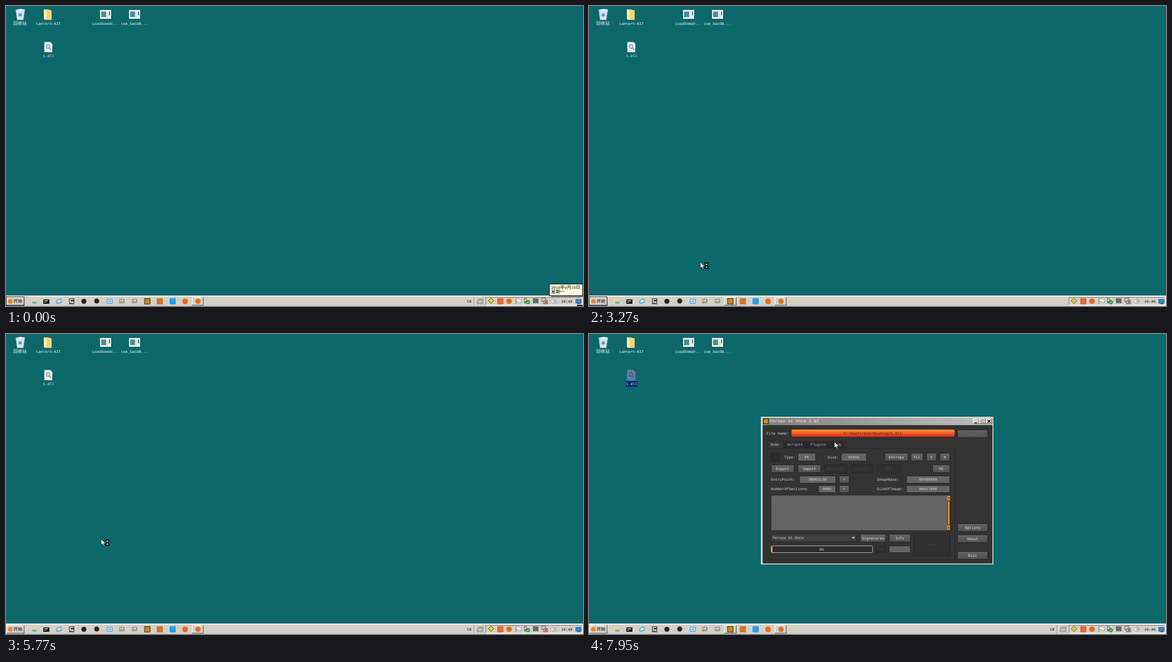
Recreate the animation shown at these times as an HTML page. Size 1037 by 540 pixels, loop 8000 ms.

```html
<!DOCTYPE html>
<html>
<head>
<meta charset="utf-8">
<title>Desktop</title>
<style>
html, body { margin: 0; width: 100%; height: 100%; overflow: hidden; background: #0d686b; }
svg { display: block; width: 1037px; height: 540px; }
text { font: 6.67px "Liberation Mono", monospace; text-rendering: geometricPrecision; white-space: pre; }
text.bold { font-size: 7.75px; font-weight: bold; }
text .cjk { font: 8px "Noto Sans CJK SC", "Noto Sans CJK", sans-serif; }
</style>
</head>
<body>
<svg id="stage" viewBox="0 0 1037 540" xmlns="http://www.w3.org/2000/svg"></svg>
<script>
const LOOP = 8000, FACE = '#d4d0c8', NAVY = '#0a246a', APP = 'Peruse At Once';

// Drawing helpers; text is placed by its vertical centre.
const rect = (x, y, w, h, fill, more = '') =>
  `<rect x="${x}" y="${y}" width="${w}" height="${h}" fill="${fill}" ${more}/>`;
const disc = (x, y, r, fill, more = '') => `<circle cx="${x}" cy="${y}" r="${r}" fill="${fill}" ${more}/>`;
const path = (d, fill, more = '') => `<path d="${d}" fill="${fill}" ${more}/>`;
const group = (id, body, more = '') => `<g id="${id}" ${more}>${body}</g>`;
const text = (x, y, s, fill = '#000', more = '') =>
  `<text x="${x}" y="${y + 2.4}" fill="${fill}" ${more}>` +
  s.replace(/>/g, '&gt;').replace(/[\u2e80-\uffff]+/g, m => `<tspan class="cjk">${m}</tspan>`) + '</text>';
const middle = (x, y, s, fill) => text(x, y, s, fill, 'text-anchor="middle"');
const edges = (x, y, w, h, light, dark) =>
  rect(x, y, w, 1, light) + rect(x, y, 1, h, light) +
  rect(x, y + h - 1, w, 1, dark) + rect(x + w - 1, y, 1, h, dark);
const raised = (x, y, w, h) => rect(x, y, w, h, FACE) + edges(x, y, w, h, '#fff', '#505050');

function desktopIcons() {
  const program = x => rect(x, 7, 20, 16, '#f4f6f6') + rect(x, 7, 20, 2, '#dfe4e6') +
    rect(x + 2, 10, 9, 10, '#4f8f8f') + rect(x + 12, 10, 3, 10, '#d8e0e0') + rect(x + 16.5, 10, 1.5, 7, '#345');
  return path('M17.5 7L34 6 31 25H20Z', '#d5e2ec', 'stroke="#8fa7b8" stroke-width=".7"') +
    path('M18 7l8-2 8 2-8 2Z', '#f3f8fb') + disc(25.5, 16, 3, '#5b9bdc') +
    path('M68 6h7l7 2v17H70l-2-2Z', '#f0d574') + path('M68 6l5 3v16l-5-2Z', '#fbeeb0') +
    program(169) + program(221) +
    middle(25, 32, '回收站', '#fff') + middle(76.5, 32, 'Lantern-KIT', '#fff') +
    middle(179, 32, 'LoadSomeD...', '#fff') + middle(230.5, 32, 'com_SandB...', '#fff') +
    fileIcon() + middle(76.5, 89.5, '1.dll', '#fff');
}

function fileIcon() {
  return path('M69 65h11l3 3v15H69Z', '#f6f8f9', 'stroke="#c5ced2" stroke-width=".5"') +
    disc(75.5, 73, 3.3, '#d3e2ea', 'stroke="#7793a4" stroke-width="1.4"') +
    path('M77 75l4 4', 'none', 'stroke="#7793a4" stroke-width="1.7"');
}

function launchIcons() {
  const lens = x => rect(x - 4, 528, 8, 6, '#f3e8c9', 'stroke="#55534c" stroke-width=".8"') +
    disc(x + 1, 530, 2.7, '#c7ddf0', 'stroke="#666" stroke-width=".8"') +
    path(`M${x - 1} 532l-3 3`, 'none', 'stroke="#b37824" stroke-width="1.5"');
  return path('M45 527h4l1 1h4v8h-9Z', '#f2d57b') + rect(47, 532, 8, 4, '#6ab0dd') +
    rect(67, 527, 11, 9, '#111') + rect(67, 527, 11, 1.3, '#b8bcc0') + rect(68.5, 530, 7, 1.2, '#fff') + rect(69, 533, 3, 1, '#ddd') +
    path('M90 533l2-4 7-2 1 7-8 2Z', '#8fc7e9', 'stroke="#4a94c2" stroke-width=".8"') + rect(93, 530, 5, 2, '#edf8ff') +
    rect(114, 527, 8, 9, '#f4f4f4', 'stroke="#222" stroke-width="1.2"') + rect(116, 529, 6, 3, '#333') + rect(115, 534, 5, 1, '#333') +
    disc(140, 531.5, 4.5, '#222') + disc(163, 531, 4.5, '#292521') +
    rect(182, 528, 9, 7, '#eaf6ff', 'stroke="#3f94d0" stroke-width="1.2"') + rect(184, 530, 5, 3, '#69b3e0') +
    lens(208) + lens(231) +
    rect(271, 526, 11, 11, '#c87a2a') + rect(294, 526, 11, 11, '#20a0e8') + disc(322, 531.5, 5.2, '#e96a1e');
}

function tray() {
  return edges(862, 524, 174, 15, '#808080', '#fff') +
    rect(868.2, 527.2, 7, 7, '#f5cf1c', 'transform="rotate(45 871.7 530.7)" stroke="#222" stroke-width=".8"') +
    rect(883, 526, 11, 11, '#e06a35') + disc(904, 531.5, 5, '#e56b25') +
    rect(916, 526, 1, 11, '#777') + path('M917 527h4l1 1h4v5h-4l-1-1h-4Z', '#fff', 'stroke="#777" stroke-width=".7"') +
    rect(931, 526, 5, 9, '#777') + rect(932, 528, 3, 3, '#ddd') + disc(938, 533, 3.7, '#279b38') +
    path('M936 533l1.5 1.5 2.5-3', 'none', 'stroke="#fff"') +
    rect(947, 526, 10, 9, '#6a6a6a') +
    rect(963, 526, 7, 6, '#ddd', 'stroke="#555"') + rect(966, 530, 7, 6, '#ddd', 'stroke="#555"') +
    path('M968 531l4 4m0-4l-4 4', 'none', 'stroke="#d22" stroke-width="1.4"') +
    path('M979 530h2l3-3v9l-3-3h-2Z', '#f5f5f5', 'stroke="#888" stroke-width=".6"') +
    path('M986 529q2 2.5 0 5m1.5-6.500q3 4 0 8', 'none', 'stroke="#888" stroke-width=".8"') +
    text(998, 531.5, '19:49') + rect(1024, 528, 10, 7, '#3488d0', 'stroke="#2b567c" stroke-width=".8"') +
    rect(1027, 535, 5, 1.5, '#444');
}

function taskbar() {
  const badge = (x, y) => rect(x, y, 11, 11, '#2b2110') + rect(x + 1, y + 1, 9, 9, '#c98a1c');
  return rect(0, 521, 1037, 19, FACE) + rect(0, 522, 1037, 1, '#fff') +
    raised(1, 524, 32, 15) + disc(8, 531.5, 4.3, '#e58a32') + text(13.5, 531.5, '开始') +
    group('focus', rect(.5, 523.5, 32, 15.5, 'none', 'stroke="#111"')) +
    launchIcons() + group('task', raised(243, 524, 22, 15)) + badge(248.5, 526) +
    raised(334, 524, 21, 15) + disc(345, 531.5, 4.8, '#e56b25') + tray() +
    group('lang', text(828.5, 531.5, 'CH') + rect(841, 524, 1, 15, '#808080') + rect(842, 524, 1, 15, '#fff') +
      path('M847 530l3-3h8l-1 9h-10Z', '#a9a7a2', 'stroke="#85837e" stroke-width=".7"') + rect(849, 531, 7, 1, '#e4e2dc') + rect(848, 533, 7, 1, '#e4e2dc')) +
    group('tip', rect(976.5, 500.5, 60, 21, '#ffffe1', 'stroke="#000"') +
      text(980, 506.5, '2019年9月23日') + text(980, 514.5, '星期一') + rect(980, 522, 57, 1.5, '#777') + rect(1026, 538, 10, 2, '#111'));
}

function menu() {
  const arrow = y => path(`M258 ${y - 2.5}l3 2.5-3 2.5Z`, '#000');
  const line = y => rect(148, y, 116, 1, '#808080') + rect(148, y + 1, 116, 1, '#fff');
  const screen = y => rect(150, y - 4, 9, 7, '#2456b0', 'stroke="#333" stroke-width=".7"') + rect(152, y + 3, 5, 1.3, '#444');
  const off = (y, s) => text(161.7, y + .7, s, '#fff') + text(161, y, s, '#8a8780');
  const active = (id, y, s) => group(id, rect(148, y - 6, 116, 12, NAVY) + text(161, y, s, '#fff') + (id === 'sortOn' ? path(`M258 ${y - 2.5}l3 2.5-3 2.5Z`, '#fff') : ''));
  return group('shadow', rect(149, 358, 120, 140, '#02383a', 'opacity=".65"')) +
    group('menu', raised(146, 355, 121, 141) +
      text(161, 362, '查看(V)') + arrow(362) + text(161, 374, '排序方式(O)') + arrow(374) + text(161, 386, '刷新(E)') +
      line(394) + off(404, '粘贴(P)') + off(416, '粘贴快捷方式(S)') + text(161, 428, '撤消 删除(U)') + text(228, 428, 'Ctrl+Z') +
      line(436) + text(161, 446, '新建(W)') + arrow(446) + line(454) +
      screen(464) + text(161, 464, '屏幕分辨率(C)') +
      rect(150, 473, 6, 7, '#e8e8e8', 'stroke="#555" stroke-width=".7"') + rect(154, 477, 5, 4, '#3a78b5') + text(161, 476.5, '小工具(G)') +
      screen(488) + text(161, 488.5, '个性化(R)') +
      active('sortOn', 374, '排序方式(O)') + active('refreshOn', 386, '刷新(E)')) +
    group('submenu', rect(268, 369, 58, 51, '#02383a', 'opacity=".65"') + raised(265, 366, 59, 52) +
      ['名称', '大小', '项目类型', '修改日期'].map((s, i) => text(276, 374 + 12 * i, s)).join(''));
}

function frame(height) {
  const button = (x, mark) => raised(x, 152, 11.5, 10) + mark;
  return rect(310.5, 150.5, 415, height - 3, 'none', `stroke="${FACE}" stroke-width="3"`) +
    edges(309, 149, 418, height, '#ebe9e3', '#b0aca4') +
    rect(312, 151, 413, 13, 'url(#title)') + rect(313, 152, 10, 10, '#2b2110') + rect(314, 153, 8, 8, '#c98a1c') +
    text(325, 157, APP + ' 2.02', FACE, 'class="bold"') +
    button(690, rect(693, 159, 4, 1.3, '#000')) + button(701.5, rect(704.5, 154.5, 5.5, 5, 'none', 'stroke="#888"')) +
    button(713, path('M716.500 154.500l5 5m0-5l-5 5', 'none', 'stroke="#000" stroke-width="1.300"'));
}

function panel(full) {
  const shift = full ? 0 : -57;
  const box = (x, y, w, h, fill, s, ink, line) =>
    rect(x + .5, y + .5, w - 1, h - 1, fill, `rx="2" stroke="${line}"`) + middle(x + w / 2, y + h / 2, s, ink);
  const button = (x, y, w, s, h = 15) => box(x, y, w, h, 'url(#button)', s, '#e8e8e8', '#232323');
  const field = (x, y, w, s, h = 14) => box(x, y, w, h, '#646464', s, '#e0e0e0', '#232323');
  const dim = (x, y, w, s, h = 16) => box(x, y, w, h, '#303030', s, '#454545', '#262626');
  const label = (x, y, s) => text(x, y, s, '#ddd');
  const when = s => full ? s : '';

  const details = button(327, 235, 42, 'Export') + button(375, 235, 42, 'Import') +
    dim(422, 235, 42, 'Resource') + dim(470, 235, 42, 'Overlay') + dim(517, 235, 43, '.NET') + button(617, 235, 32, 'PE') +
    label(327, 261.5, 'EntryPoint:') + field(378, 255, 66, '00001c30') + button(449, 255, 19, '>', 14) +
    label(517, 261.5, 'ImageBase:') + field(570, 255, 79, '00400000') +
    label(327, 279, 'NumberOfSections:') + field(412, 272, 32, '0005') + button(449, 272, 19, '>', 14) +
    label(517, 279, 'SizeOfImage:') + field(570, 272, 79, '00017000');

  const lower = rect(327, 290, 322, 64, '#646464', 'stroke="#272727"') + rect(644, 290, 5, 64, '#333') +
    rect(645, 301, 3, 42, '#e8912c') + rect(644, 291, 5, 9, '#d88424') + rect(644, 344, 5, 9, '#d88424') +
    rect(646, 294, 1.5, 2, '#222') + rect(646, 348, 1.5, 2, '#222') +
    rect(327, 360, 154, 14, '#414141', 'rx="2" stroke="#272727"') + label(330, 367, APP) + path('M472 365.500h6l-3 3Z', '#ddd') +
    button(487, 360, 47, 'Signatures') + button(539, 360, 39, 'Info') + dim(583, 358, 66, 'Stop', 41) +
    rect(327.5, 381.5, 182, 12, '#2c2c2c', 'rx="2" stroke="#b5b5b5"') +
    when(group('progress', rect(328, 382, 2, 11, '#e8912c') + middle(418, 387.5, '0%', '#ddd'))) +
    dim(515, 381, 19, '>', 13) + field(539, 381, 39, '', 13) +
    button(662, 341, 55, 'Options') + button(662, 361, 55, 'About') + button(662, 391, 55, 'Exit');

  return rect(312, 164, 413, 249 + shift, '#333') +
    label(319, 179, 'File name:') + rect(364, 172, 293, 13, 'url(#fire)', 'rx="2"') +
    when(middle(510, 179, 'C:/Users/pim/Desktop/1.dll', '#3a1509')) + button(662, 172, 55, '...') +
    rect(319.5, 205.5, 338, 201 + shift, 'none', 'stroke="#282828"') +
    rect(349, 193, 111, 12, '#292929', 'rx="2"') + rect(320, 192, 29, 14, '#363636', 'stroke="#282828"') +
    middle(334, 198.5, 'Scan', '#ddd') + middle(370, 198.5, 'Scripts', '#bbb') +
    middle(412, 198.5, 'Plugins', '#bbb') + middle(447, 198.5, 'Log', '#bbb') +
    rect(327.5, 214.5, 15, 15, '#2d2d2d', 'rx="2" stroke="#222"') +
    label(351, 222, 'Type:') + field(375, 214, 33, when('PE'), 15) +
    label(429, 222, 'Size:') + field(453, 214, 46, when('81920'), 15) +
    button(531, 214, 43, 'Entropy') + button(578, 214, 23, 'FLC') + button(606, 214, 19, 'S') + button(630, 214, 19, 'H') +
    when(details) + `<g transform="translate(0 ${shift})">${lower}</g>`;
}

function pointer() {
  const ink = 'stroke="#000" stroke-width=".8" stroke-linejoin="round"';
  return group('arrow', path('M0 0V11.300L2.700 8.800 4.600 13 6.400 12.200 4.600 8.200H8Z', '#fff', ink)) +
    group('hourglass', path('M8 1h6.600v2.500L12.500 6.300l2.100 2.700v2.600H8V9l2.100-2.700L8 3.500Z', '#111', 'stroke="#000" stroke-width=".600"') +
      path('M9 3h4.600l-2.300 2.500Zm2.300 4.500l2 2.500H9.300Z', '#fff')) +
    group('hand', path('M-1-.5h2v4l5.500 1.300v3l-1.300 3H-1.500L-3.500 6l1.200-.8 1.300 1Z', '#fff', ink));
}

const gradient = (id, a, b, across) =>
  `<linearGradient id="${id}" x2="${across}" y2="${1 - across}"><stop stop-color="${a}"/><stop offset="1" stop-color="${b}"/></linearGradient>`;

document.getElementById('stage').innerHTML =
  '<defs>' + gradient('title', '#808080', '#c0c0c0', 1) + gradient('button', '#646464', '#505050', 0) + gradient('fire', '#ff9638', '#dc2613', 0) + '</defs>' +
  rect(0, 0, 1037, 540, '#0d686b') + group('icons', desktopIcons()) +
  group('selected', rect(69, 65, 14, 18, '#173b78', 'opacity=".65"') + rect(66, 85, 21, 10, NAVY) + middle(76.5, 89.5, '1.dll', '#fff')) +
  group('small', frame(210)) + group('smallBody', panel(false)) +
  group('large', frame(266) + panel(true)) +
  taskbar() + menu() +
  group('ghost', fileIcon() + middle(76.5, 89.5, '1.dll', '#fff'), 'opacity=".5"') +
  group('pointer', pointer());

// Visible spans of each layer in ms, as pairs of start and end.
const spans = {
  tip: [0, 2300], lang: [0, 2300, 3430, LOOP], task: [2330, 3430, 5800, LOOP], focus: [0, 3900],
  icons: [0, 5590, 5650, LOOP], shadow: [4360, 5560], menu: [4310, 5560], sortOn: [4830, 5270],
  refreshOn: [5270, 5560], submenu: [5180, 5560], small: [5950, 7750], smallBody: [6550, 7750],
  large: [7750, LOOP], progress: [7900, LOOP], selected: [7050, LOOP], ghost: [7100, 7750],
  pointer: [20, LOOP], hourglass: [2840, 5970]
};

// Pointer stops: time, x, y.
const stops = [
  [20, 703, 461], [820, 243, 530], [860, 243, 530], [1310, 182, 530], [1460, 182, 530],
  [1900, 265, 530], [2140, 250, 530], [3090, 250, 530], [3270, 200, 462], [3450, 146, 355],
  [3670, 146, 355], [4140, 163, 375], [4830, 163, 375], [5270, 171, 386], [5650, 171, 386],
  [5970, 171, 342], [6220, 171, 342], [6420, 171, 193], [6890, 75, 73], [7050, 75, 73],
  [7850, 437, 191], [7950, 441, 194], [LOOP, 441, 194]
];
const fades = [[4510, 1], [4460, .6], [4410, .25], [4360, .12], [0, .05]];
const byId = id => document.getElementById(id);
const show = (id, on) => { byId(id).style.display = on ? '' : 'none'; };
const within = (t, span) => span.some((from, i) => i % 2 === 0 && t >= from && t < span[i + 1]);

function pointerAt(t) {
  const next = Math.max(1, stops.findIndex(s => s[0] > t));
  const [t0, x0, y0] = stops[next - 1], [t1, x1, y1] = stops[next];
  const k = Math.max(0, (t - t0) / (t1 - t0));
  return [Math.round(x0 + (x1 - x0) * k), Math.round(y0 + (y1 - y0) * k)];
}

function draw() {
  const t = performance.now() % LOOP;
  for (const id in spans) show(id, within(t, spans[id]));
  byId('menu').setAttribute('opacity', fades.find(f => t >= f[0])[1]);
  const [x, y] = pointerAt(t);
  const hand = y > 521 && t < 2840;
  show('hand', hand);
  show('arrow', !hand);
  byId('pointer').setAttribute('transform', `translate(${x} ${y})`);
  byId('ghost').setAttribute('transform', `translate(${x - 75} ${y - 73})`);
  requestAnimationFrame(draw);
}
draw();
</script>
</body>
</html>
```
